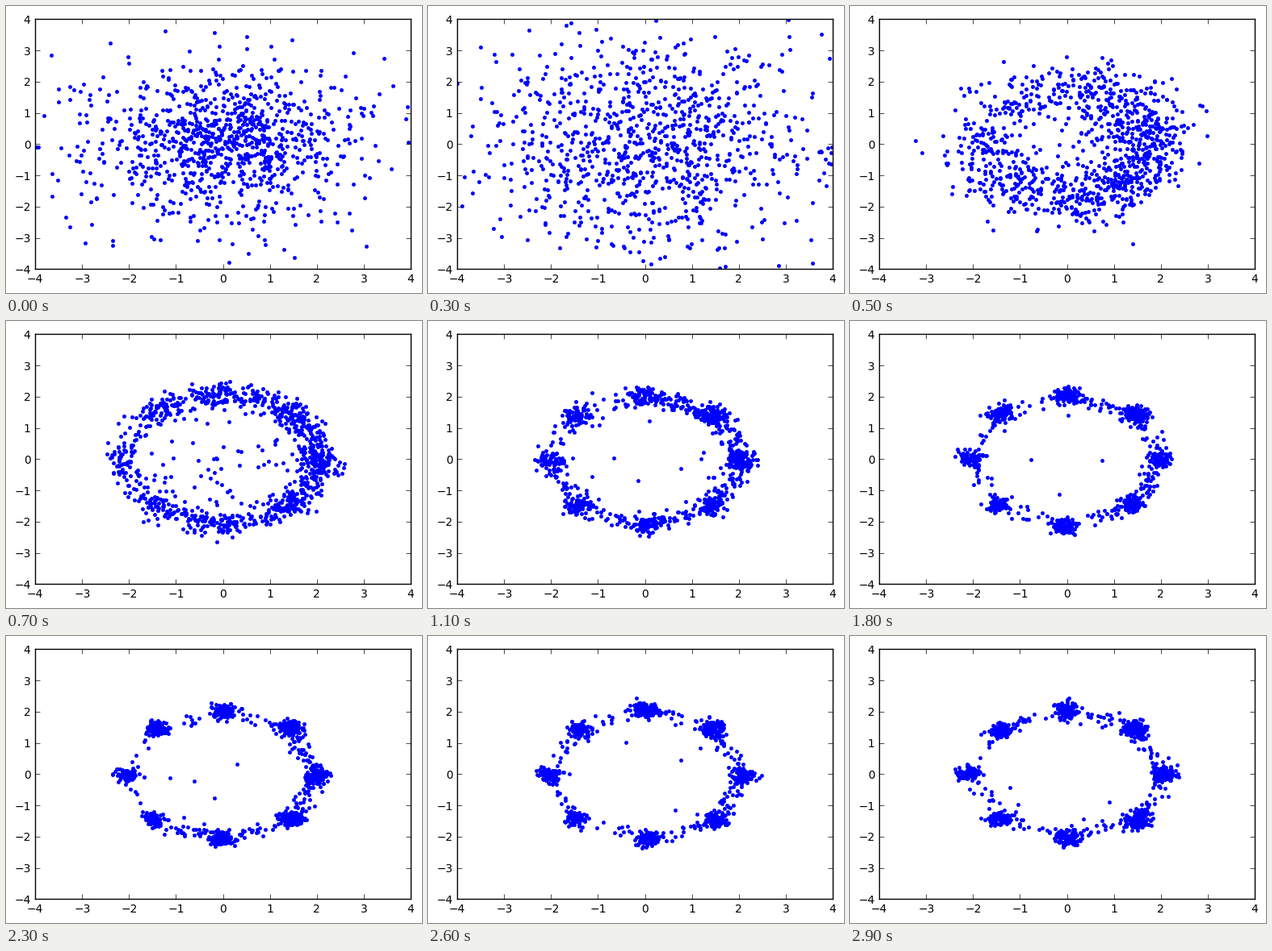
These frames come from a looping animation (515x356 px, 3000 ms). A matplotlib script:

```python
import numpy as np
import matplotlib.pyplot as plt
from matplotlib.animation import FuncAnimation

W, H, DPI = 515, 356, 100
FRAMES, STEP = 30, 100
COUNT = 1000
RADIUS = 2.05
FORMED = 7  # frame at which the ring is complete

plt.rcParams.update({
    "font.family": "DejaVu Sans",
    "font.size": 10,
    "axes.linewidth": 1.0,
    "xtick.direction": "in",
    "ytick.direction": "in",
    "xtick.top": True,
    "ytick.right": True,
    "xtick.major.size": 4,
    "ytick.major.size": 4,
    "xtick.major.width": 0.5,
    "ytick.major.width": 0.5,
    "xtick.major.pad": 4,
    "ytick.major.pad": 4,
})


def polar(r, a):
    return np.column_stack([r * np.cos(a), r * np.sin(a)])


def cloud(rng, k):
    """Loose start: a dense middle in a wide halo, both growing at first."""
    grow = min(k / 3, 1)
    halo = rng.normal(size=(600, 2)) * (1.75 + 0.25 * grow, 1.45 + 0.45 * grow)
    core = rng.normal(size=(400, 2)) * (0.95 + 0.5 * grow) + (0.2, 0.15)
    return rng.permutation(np.vstack([halo, core]))


def ring(rng, k):
    """Eight modes on a circle, joined by bridges that thin out over time."""
    age = max(k - FORMED, 0)
    bow = np.exp(-age / 6)
    spread = 0.12 + 0.08 * np.exp(-age / 4)
    bridge_share = 0.2 + 0.55 * np.exp(-age / 4.5)
    strays = int(4 + 38 * np.exp(-age / 2))
    n = COUNT - strays

    angle = np.arange(8) * np.pi / 4
    centers = polar(RADIUS, angle) + rng.normal(0, 0.03, (8, 2))

    # The right side is favoured, most of all by the bridges.
    modes = 1 + 0.15 * np.cos(angle) + rng.uniform(-0.15, 0.15, 8)
    bridges = 1 + 0.5 * np.cos(angle + np.pi / 8) + rng.uniform(-0.25, 0.25, 8)
    share = np.concatenate([modes / modes.sum() * (1 - bridge_share),
                            bridges / bridges.sum() * bridge_share])
    part = rng.choice(16, n, p=share)
    on_bridge = (part >= 8)[:, None]

    here, after = centers[part % 8], centers[(part + 1) % 8]
    pts = here + (after - here) * rng.random((n, 1)) * on_bridge
    length = np.hypot(*pts.T)[:, None]
    pts *= 1 + on_bridge * bow * (RADIUS / length - 1)
    pts += rng.normal(0, spread, (n, 2))

    inner = polar(1.5 * np.sqrt(rng.random(strays)),
                  2 * np.pi * rng.random(strays))
    return np.vstack([pts, inner])


def samples(k):
    rng = np.random.default_rng(400 + k)
    x = np.clip((k - 3) / (FORMED - 3), 0, 1)
    pull = 1 - (1 - x) ** 2
    return (1 - pull) * cloud(rng, k) + np.sqrt(pull) * ring(rng, k)


fig = plt.figure(figsize=(W / DPI, H / DPI), dpi=DPI, facecolor="white")
ax = fig.add_axes([36.1 / W, 29.65 / H, 465 / W, 310 / H])
ax.set(xlim=(-4, 4), ylim=(-4, 4), xticks=range(-4, 5), yticks=range(-4, 5))
ax.set_axisbelow(False)
dots, = ax.plot([], [], ".", color=(0, 0, 1), markersize=6, markeredgewidth=0.5)


def draw(k):
    dots.set_data(*samples(k).T)
    return dots,


anim = FuncAnimation(fig, draw, frames=FRAMES, interval=STEP,
                     repeat=True, repeat_delay=0)
plt.show()
```
